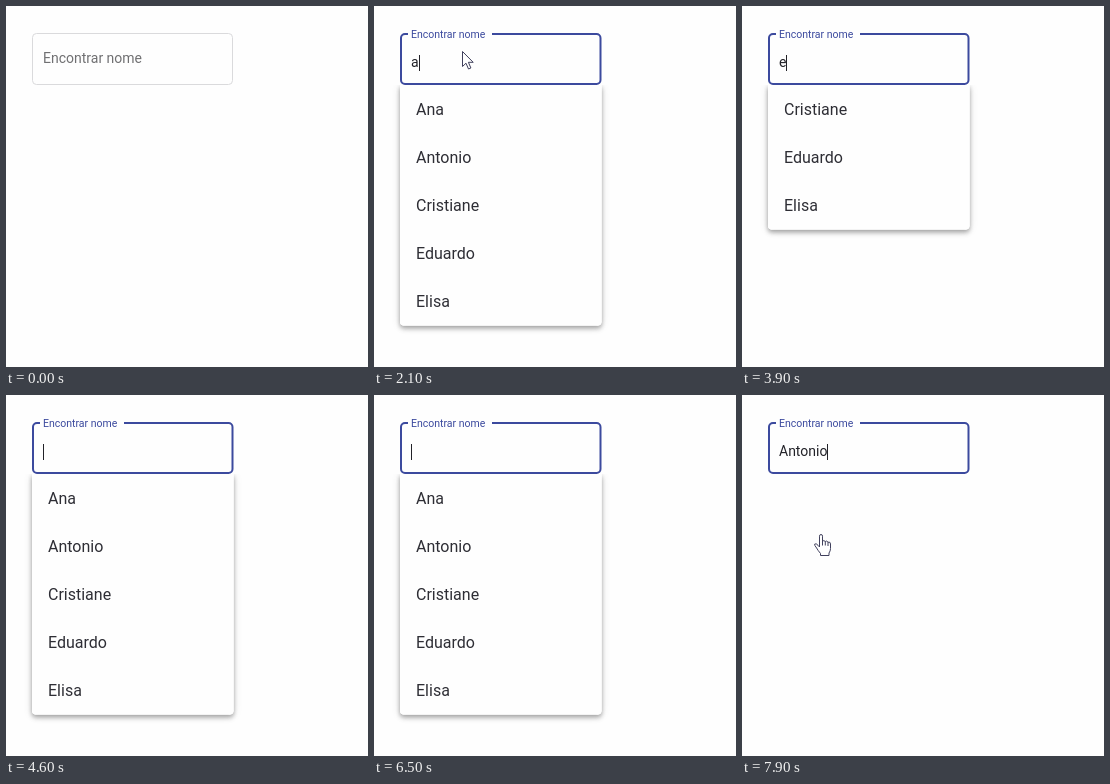
An HTML page with a canvas for the animation above (8 s loop, 362 by 361 pixels).

```html
<!DOCTYPE html>
<html lang="pt">
<head>
<meta charset="utf-8">
<title>Encontrar nome</title>
<style>
  html, body { margin: 0; width: 100%; height: 100%; overflow: hidden; background: #fefefe; }
  canvas { display: block; }
</style>
</head>
<body>
<canvas id="stage" width="362" height="361"></canvas>
<script>
const ctx = document.getElementById('stage').getContext('2d');
const LOOP = 8000, STEP = 100;
const BG = '#fefefe', ACCENT = '#3c4a9e', INK = '#2e2e35';
const NAMES = ['Ana', 'Antonio', 'Cristiane', 'Eduardo', 'Elisa'];
const FOCUS = 500, PICK = 7700;

// time, typed text, caret visible
const INPUT = [
  [0, '', 0], [FOCUS, '', 1], [1400, '', 0], [1900, '', 1],
  [2100, 'a', 1], [2200, 'an', 1], [2800, 'an', 0], [2900, 'a', 1], [3100, '', 1],
  [3800, '', 0], [3900, 'e', 1], [4500, '', 1], [5000, '', 0],
  [5300, 'c', 1], [5400, 'cr', 1], [5600, 'cri', 1], [6100, 'cri', 0],
  [6200, 'cr', 1], [6300, 'c', 1], [6500, '', 1], [7200, '', 0], [PICK, 'Antonio', 1]
];

const clamp = v => Math.max(0, Math.min(1, v));
const lerp = (a, b, p) => a + (b - a) * p;
const progress = (t, start, length) => clamp((t - start) / length);
const easeOut = p => 1 - Math.pow(1 - p, 3);

function text(str, x, y, size, color) {
  ctx.font = `${size}px Roboto, sans-serif`;
  ctx.fillStyle = color;
  ctx.fillText(str, x, y);
}

function drawField(t, value, caret) {
  const focused = t >= FOCUS;
  const float = easeOut(progress(t, FOCUS - 50, 400));
  const hover = t >= 300;
  ctx.beginPath();
  if (focused || hover) {
    ctx.roundRect(27, 28, 199.5, 50, 4);
    ctx.lineWidth = 2;
    ctx.strokeStyle = focused ? ACCENT : '#333';
  } else {
    ctx.roundRect(26.5, 27.5, 200, 51, 4);
    ctx.lineWidth = 1;
    ctx.strokeStyle = '#dadadc';
  }
  ctx.stroke();

  if (focused) {
    const half = 42 * float;
    ctx.fillStyle = BG;
    ctx.fillRect(76 - half, 26, half * 2, 4);
  }
  text('Encontrar nome', 37, lerp(57, 32, float), lerp(14, 10.5, float),
    focused ? ACCENT : '#707072');

  text(value, 37, 61, 14, '#222228');
  if (caret) {
    const x = 37 + Math.round(ctx.measureText(value).width);
    ctx.fillStyle = '#222228';
    ctx.fillRect(x, 49, 1, 16);
  }
}

function drawPanel(t, value, hover) {
  const open = progress(t, FOCUS, 150);
  const alpha = open * (1 - progress(t, PICK, 150));
  if (!alpha) return;
  const query = t < PICK ? value : '';
  const list = NAMES.filter(n => n.toLowerCase().includes(query));
  const height = list.length * 48 + 0.5;

  ctx.save();
  ctx.globalAlpha = alpha;
  ctx.beginPath();
  ctx.rect(0, 79, 362, 282);
  ctx.clip();
  ctx.translate(0, 79);
  ctx.scale(1, lerp(0.8, 1, open));
  ctx.fillStyle = '#fff';
  for (const [dy, blur, shade] of [[2, 4, 0.24], [4, 5, 0.12], [1, 10, 0.12]]) {
    ctx.shadowColor = `rgba(0,0,0,${shade})`;
    ctx.shadowOffsetY = dy;
    ctx.shadowBlur = blur;
    ctx.beginPath();
    ctx.roundRect(26, 0, 201.5, height, [0, 0, 4, 4]);
    ctx.fill();
  }
  ctx.shadowColor = 'transparent';
  ctx.fillStyle = '#fefefe';
  ctx.fill();
  list.forEach((name, i) => {
    if (i === hover) {
      ctx.fillStyle = '#f3f3f3';
      ctx.fillRect(26, i * 48, 201.5, 48);
    }
    text(name, 42, i * 48 + 29.5, 16, INK);
  });
  ctx.restore();
}

const ARROW = new Path2D('M.5 .5V15.5L4 12.2L6.5 18L8.9 17L6.4 11.3H11.2Z');
const HAND = new Path2D(
  'M5.5 13V2.2Q5.5 .5 7 .5T8.5 2.2V7.2Q9.8 5.8 11.3 7.5Q12.8 6.3 14 8.2Q16.5 7.5 16.5 10' +
  'V14.5Q16.5 17 15 19V21.5H6.5V19.5Q4 16.5 2.6 14Q.2 11 .6 10.2Q2 8.8 4 11.3L5.5 13');
const KNUCKLES = new Path2D('M8.5 7V11.5M11.3 7.5V11.5M14 8.2V12');

function drawMouse(x, y, hand) {
  ctx.save();
  ctx.translate(x, y);
  ctx.lineWidth = 1;
  ctx.lineJoin = 'round';
  ctx.fillStyle = '#fff';
  ctx.strokeStyle = '#40405c';
  ctx.fill(hand ? HAND : ARROW);
  ctx.stroke(hand ? HAND : ARROW);
  if (hand) ctx.stroke(KNUCKLES);
  ctx.restore();
}

function mouseAt(t) {
  if (t >= 200 && t < 2900) {
    const p = easeOut(progress(t, 100, 500));
    return { x: lerp(160, 88, p), y: lerp(64, 45, p), hand: false };
  }
  if (t >= 7300) {
    const p = progress(t, 7200, 300);
    const y = lerp(45, 139, easeOut(p));
    return { x: lerp(86, 72, p), y, hand: y > 79 };
  }
  return null;
}

function draw(t) {
  const [, value, caret] = INPUT.findLast(row => row[0] <= t);
  const mouse = mouseAt(t);
  const hover = mouse && mouse.hand ? Math.floor((mouse.y - 79) / 48) : -1;
  ctx.fillStyle = BG;
  ctx.fillRect(0, 0, 362, 361);
  drawField(t, value, caret);
  drawPanel(t, value, hover);
  if (mouse) drawMouse(mouse.x, mouse.y, mouse.hand);
}

const start = performance.now();
function tick() {
  const t = (performance.now() - start) % LOOP;
  draw(Math.floor(t / STEP) * STEP);
  requestAnimationFrame(tick);
}
tick();
</script>
</body>
</html>
```
